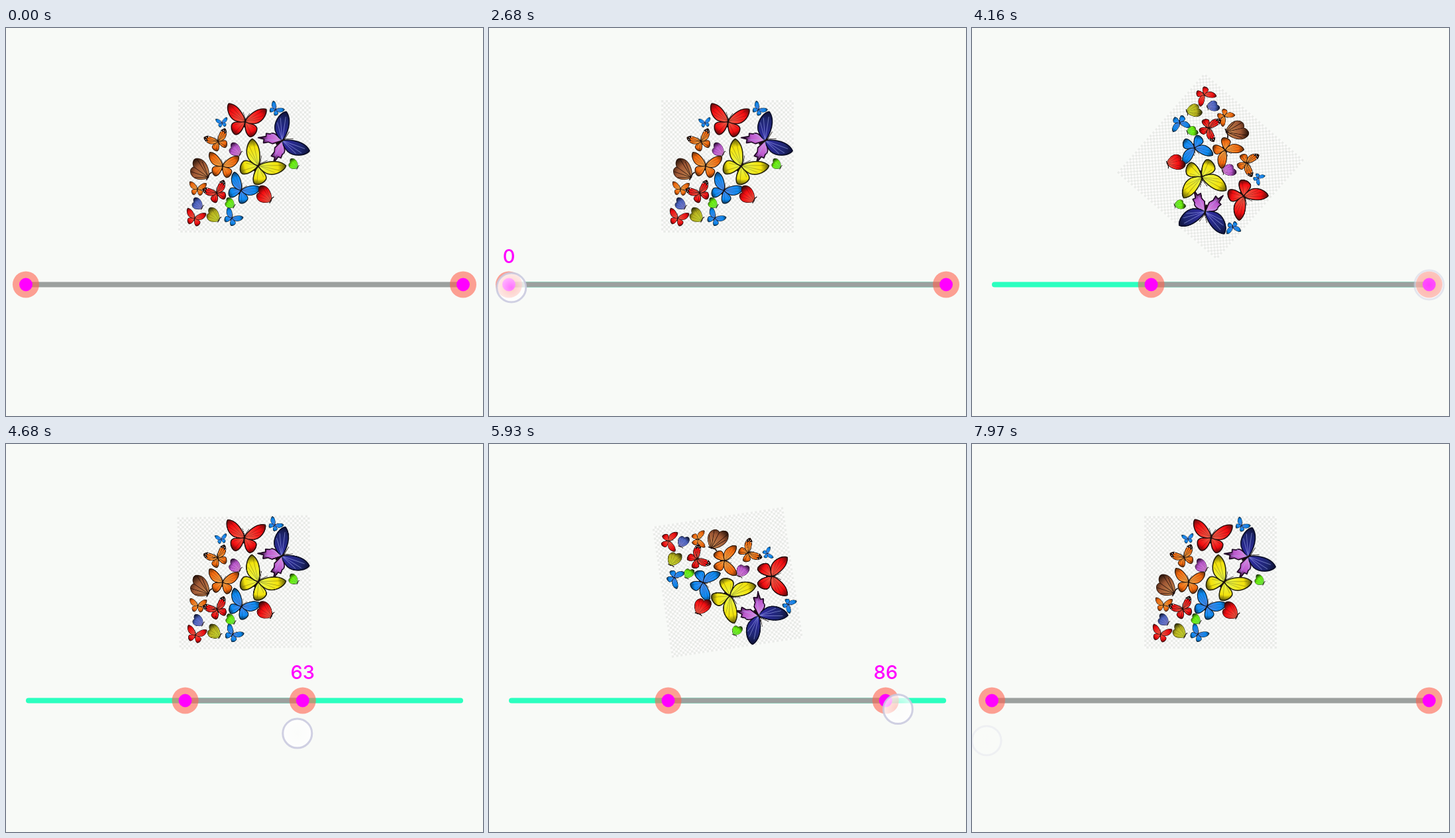
Write an HTML page with a canvas that moves like this. It is 720 px wide and 586 px high and loops after 8.25 s.

```html
<!DOCTYPE html>
<html>
<head>
<meta charset="utf-8">
<style>
html, body { margin: 0; width: 100%; height: 100%; overflow: hidden; background: #f8faf7; }
canvas { display: block; }
</style>
</head>
<body>
<canvas id="stage" width="720" height="586"></canvas>
<script>
const LOOP = 8250, REST = 7970, X0 = 30, X1 = 690, BAR_Y = 387.5, CELLS = 60;
const ctx = document.getElementById('stage').getContext('2d');

const clamp = v => Math.max(0, Math.min(1, v));
function ease(t, from, to) {
  const p = clamp((t - from) / (to - from));
  return p * p * (3 - 2 * p);
}
const shown = (t, from, to) => clamp(Math.min(t - from, to - t) / 120);

// Handle positions
const leftAt = t => X0 + 240.5 * (ease(t, 2680, 3200) - ease(t, 7000, 7480));
const rightAt = t => X1 - 254 * (ease(t, 4200, 4753) - ease(t, 5564, 6181));

// Butterflies
const hues = { red: 359, orange: 24, brown: 20, yellow: 56, olive: 58, green: 95, blue: 207, navy: 234, violet: 228, purple: 290 };
const muted = { brown: [50, 42], olive: [72, 42], navy: [58, 28], violet: [50, 54], purple: [55, 58] };

function shades(name) {
  const h = hues[name], [s, l] = muted[name] || [90, 50];
  return [`hsl(${h + 8} ${s}% ${l + 12}%)`, `hsl(${h} ${s}% ${l}%)`, `hsl(${h} 60% 9%)`];
}

const fore = new Path2D('M0 0C.1-.35 .5-.95 .95-.9C1.06-.65 .86-.08 .5 .05C.3 .1 .1 .08 0 0Z');
const hind = new Path2D('M0 .02C.25 .12 .55 .06 .64 .3C.68 .58 .5 .88 .34 .86C.14 .76 .04 .4 0 .1Z');
const tail = new Path2D('M0 0C.3 .1 .5 .1 .5 .35L.6 .5L.5 .58L.62 .95L.44 .74L.32 .86L.24 .62L.1 .5Z');
const veins = new Path2D('M0 0L.78-.75M0 0L.86-.5M0 0L.76-.25M0 0L.5 .3M0 0L.4 .7');
const folded = new Path2D('M.8 .8C.95 0 .5-1-.3-1C-.7-1-.75-.5-.6-.2C-1.1 0-.95 .6-.5 .85C-.1 1.05 .5 1 .8 .8Z');
const ribs = new Path2D('M.8 .8L-.3-.95M.8 .8L.2-.7M.8 .8L-.6-.2M.8 .8L-.85 .25M.8 .8L-.5 .8');

function paint(g, path, colors, x, y, r) {
  const fill = g.createRadialGradient(x, y, 0, x, y, r);
  colors.forEach((c, i) => fill.addColorStop([.1, .65, 1][i], c));
  g.fillStyle = fill;
  g.strokeStyle = colors[2];
  g.lineWidth = .05;
  g.fill(path);
  g.stroke(path);
}

function draw(g, path, width, color) {
  g.lineWidth = width;
  g.strokeStyle = color;
  g.stroke(path);
}

function drawOpen(g, name, kind) {
  const colors = shades(name), tailed = kind === 'tailed', monarch = kind === 'monarch';
  for (const side of [-1, 1]) {
    g.save();
    g.scale(side, 1);
    paint(g, tailed ? tail : hind, tailed ? shades('purple') : colors, 0, 0, 1.02);
    paint(g, fore, colors, 0, 0, 1.42);
    draw(g, veins, .03, tailed ? '#a9b4f088' : monarch ? '#180808cc' : '#18080844');
    if (monarch) {
      draw(g, new Path2D('M.6-.78Q.98-.95 .84-.4'), .2, '#180a08');
      g.setLineDash([.07, .13]);
      draw(g, new Path2D('M.55-.74Q1-.95 .85-.3'), .07, '#fff');
      g.setLineDash([]);
    }
    g.restore();
  }
  draw(g, new Path2D('M0-.14L0 .36'), .07, '#180e0e');
  draw(g, new Path2D('M-.17-.52L0-.14L.17-.52'), .02, '#180e0e');
}

function drawFolded(g, name) {
  paint(g, folded, shades(name), .8, .8, 2.15);
  draw(g, ribs, .05, name === 'brown' ? '#180808dd' : '#18080855');
  draw(g, new Path2D('M.9 .45L.6 1.05M.9 .45L1.1 .3'), .1, '#180e0e');
}

function makePicture() {
  const c = document.createElement('canvas');
  c.width = c.height = 400;
  const g = c.getContext('2d'), cell = 200 / CELLS;
  g.scale(2, 2);
  g.fillStyle = '#fcfcfb';
  g.fillRect(0, 0, 200, 200);
  g.fillStyle = '#e9ebe8';
  for (let y = 0; y < CELLS; y++)
    for (let x = y % 2; x < CELLS; x += 2) g.fillRect(x * cell, y * cell, cell, cell);
  g.lineJoin = 'round';

  // The flock turns clockwise towards the right and the bottom
  function fly(kind, name, x, y, size) {
    const tilt = kind === 'monarch' ? -23 : .003 * x * x + y / 4 - 30;
    g.save();
    g.translate(x, y);
    g.scale(size, size);
    if (kind === 'folded') drawFolded(g, name);
    else {
      g.rotate(tilt * Math.PI / 180);
      g.scale(1, .85);
      drawOpen(g, name, kind);
    }
    g.restore();
  }

  fly('plain', 'red', 101, 32, 30);
  fly('plain', 'blue', 147, 14, 11);
  fly('plain', 'blue', 66, 34, 9);
  fly('monarch', 'orange', 60, 62, 18);
  fly('tailed', 'navy', 157, 61, 36);
  fly('plain', 'yellow', 121, 99, 34);
  fly('plain', 'orange', 67, 99, 23);
  fly('plain', 'orange', 29, 134, 13);
  fly('monarch', 'red', 58, 140, 18);
  fly('plain', 'blue', 95, 136, 24);
  fly('plain', 'red', 25, 178, 15);
  fly('plain', 'blue', 81, 178, 14);
  fly('folded', 'purple', 86, 74, 10);
  fly('folded', 'green', 174, 96, 8);
  fly('folded', 'brown', 33, 104, 16);
  fly('folded', 'red', 130, 142, 13);
  fly('folded', 'violet', 29, 156, 9);
  fly('folded', 'green', 78, 155, 8);
  fly('folded', 'olive', 53, 173, 11);
  return c;
}
const picture = makePicture();

// Slider
function disc(x, y, r, color) {
  ctx.fillStyle = color;
  ctx.beginPath();
  ctx.arc(x, y, r, 0, Math.PI * 2);
  ctx.fill();
}

function bar(a, b, color) {
  ctx.fillStyle = color;
  ctx.beginPath();
  ctx.roundRect(a, BAR_Y - 4, b - a, 8, 4);
  ctx.fill();
}

function thumb(x, labelAlpha) {
  disc(x, BAR_Y, 20, 'rgba(255,99,80,.6)');
  disc(x, BAR_Y, 10, '#ff00ff');
  ctx.globalAlpha = labelAlpha;
  ctx.fillText(Math.floor((x - X0) / (X1 - X0) * 100), x, 355);
  ctx.globalAlpha = 1;
}

function touch(x, y, alpha) {
  ctx.globalAlpha = alpha;
  const fill = ctx.createRadialGradient(x, y, 0, x, y, 22);
  fill.addColorStop(0, 'rgba(255,255,255,.45)');
  fill.addColorStop(1, 'rgba(255,255,255,.8)');
  disc(x, y, 22, fill);
  ctx.strokeStyle = 'rgba(200,200,222,.85)';
  ctx.lineWidth = 3;
  ctx.stroke();
  ctx.globalAlpha = 1;
}

function frame(now) {
  const t = Math.min(now % LOOP, REST);
  const left = leftAt(t), right = rightAt(t);
  ctx.fillStyle = '#f8faf7';
  ctx.fillRect(0, 0, 720, 586);

  ctx.save();
  ctx.translate(360, 209);
  ctx.rotate((left - X0 + right - X1) / (X1 - X0) * Math.PI * 2);
  ctx.drawImage(picture, -100, -100, 200, 200);
  ctx.restore();

  if (left > X0 || right < X1) bar(X0, X1, '#2bffbf');
  bar(left, right, '#9ca09e');

  ctx.font = '500 29px Inter, sans-serif';
  ctx.textAlign = 'center';
  thumb(left, Math.max(shown(t, 2430, 3620), shown(t, 7000, 7750)));
  thumb(right, shown(t, 4200, 6560));

  // The finger runs slightly ahead of the handle and sinks below the bar
  const ahead = t + 32, exit = ease(t, 7000, 7600);
  const sink = Math.pow((X1 - right) / 242, 1.4);
  touch(leftAt(ahead) + 1, 392, shown(t, 2190, 3930));
  touch(rightAt(ahead), 388 + 49 * sink, shown(t, 4100, 6600));
  touch(leftAt(t) + 2 - 10 * exit, 385 + 63 * exit, shown(t, 6850, 8000));
  requestAnimationFrame(frame);
}
requestAnimationFrame(frame);
</script>
</body>
</html>
```
